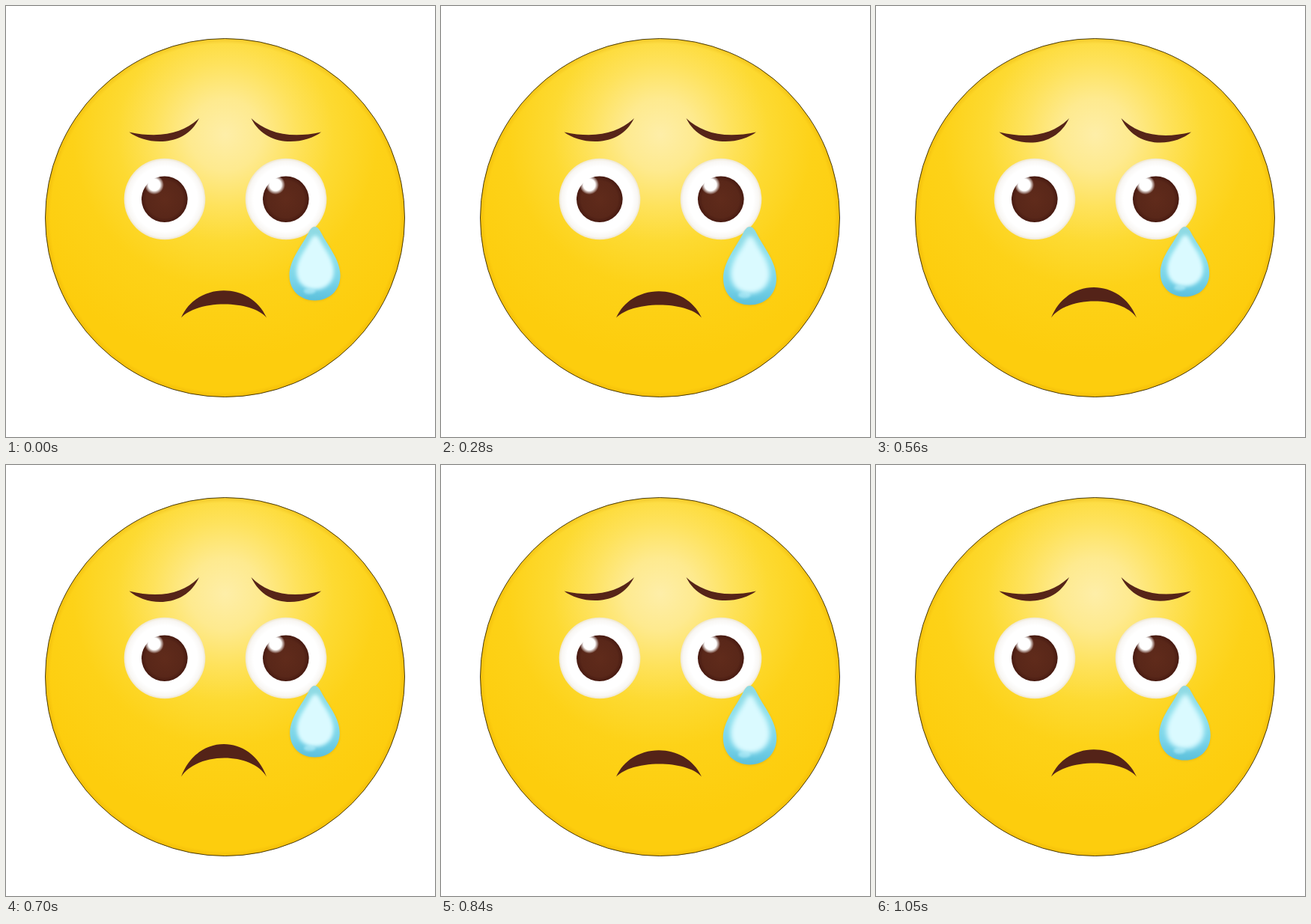
These frames come from a looping animation (573 px wide and 576 px high, 1120 ms). An HTML page:

```html
<!DOCTYPE html>
<html lang="en">
<head>
<meta charset="utf-8">
<title>Crying face</title>
<style>
  html, body { margin: 0; width: 100%; height: 100%; overflow: hidden; background: #fff; }
  svg { display: block; width: 100%; height: 100%; }
</style>
</head>
<body>
<svg viewBox="0 0 573 576" xmlns="http://www.w3.org/2000/svg">
  <defs>
    <radialGradient id="skin" gradientUnits="userSpaceOnUse" cx="293" cy="172" r="300">
      <stop offset="0" stop-color="#feeea8"/>
      <stop offset=".16" stop-color="#feea8f"/>
      <stop offset=".32" stop-color="#fee25c"/>
      <stop offset=".48" stop-color="#fdda32"/>
      <stop offset=".68" stop-color="#fdd218"/>
      <stop offset="1" stop-color="#fdcd0d"/>
    </radialGradient>
    <radialGradient id="rim">
      <stop offset=".97" stop-color="#e5a800" stop-opacity="0"/>
      <stop offset="1" stop-color="#dfa000" stop-opacity=".35"/>
    </radialGradient>
    <radialGradient id="white">
      <stop offset=".8" stop-color="#fff"/>
      <stop offset=".94" stop-color="#f8f6f3"/>
      <stop offset="1" stop-color="#efe6cd"/>
    </radialGradient>
    <radialGradient id="iris">
      <stop offset="0" stop-color="#602b1b"/>
      <stop offset=".8" stop-color="#592719"/>
      <stop offset="1" stop-color="#471a11"/>
    </radialGradient>
    <radialGradient id="glint">
      <stop offset=".6" stop-color="#fff"/>
      <stop offset="1" stop-color="#fff" stop-opacity="0"/>
    </radialGradient>
    <linearGradient id="water" x1="0" y1="0" x2="0" y2="1">
      <stop offset="0" stop-color="#8fd9e2"/>
      <stop offset=".4" stop-color="#8fe0ec"/>
      <stop offset=".75" stop-color="#78d3e8"/>
      <stop offset="1" stop-color="#5cc0dc"/>
    </linearGradient>
    <filter id="soft" x="-30%" y="-30%" width="160%" height="160%"><feGaussianBlur stdDeviation="4"/></filter>
    <filter id="shade" x="-30%" y="-30%" width="160%" height="160%"><feGaussianBlur stdDeviation="1.6"/></filter>
    <path id="drop" d="M0 0C3.5 0 6 3 9 9C17 25 34 44 34 65C34 85.5 19 98.5 0 98.5S-34 85.5-34 65C-34 44-17 25-9 9C-6 3-3.5 0 0 0Z"/>
    <g id="eye">
      <circle r="54.3" fill="url(#white)"/>
      <circle cx="-.2" cy=".3" r="30.8" fill="url(#iris)"/>
      <circle cx="-14" cy="-19" r="13" fill="url(#glint)"/>
    </g>
    <path id="brow" fill="#562418"/>
  </defs>

  <ellipse cx="292.5" cy="283" rx="240" ry="239.5" fill="url(#skin)"/>
  <ellipse cx="292.5" cy="283" rx="240" ry="239.5" fill="url(#rim)"/>
  <ellipse cx="292.5" cy="283" rx="240" ry="239.5" fill="none" stroke="#2b2205" stroke-opacity=".85"/>
  <use href="#brow"/>
  <use href="#brow" transform="translate(585.5) scale(-1 1)"/>
  <use href="#eye" x="212" y="258"/>
  <use href="#eye" x="374" y="258"/>
  <path id="mouth" fill="#542318"/>
  <g id="tear">
    <use href="#drop" y="1" fill="#b98c1c" opacity=".3" filter="url(#shade)"/>
    <use href="#drop" fill="url(#water)"/>
    <use href="#drop" transform="translate(.5 12) scale(.73)" fill="#dafaff" filter="url(#soft)"/>
    <ellipse cx="-7" cy="86" rx="8" ry="4" fill="#b9effa" opacity=".6" filter="url(#shade)"/>
  </g>
</svg>
<script>
  const STEP = 70, LOOP = 1120;
  const byId = id => document.getElementById(id);
  const [brow, mouth, tear] = ["brow", "mouth", "tear"].map(byId);

  // [time, value] keys: lower end of the tear, top of the mouth, sag of the brows
  const tearKeys = [[0, 394], [140, 400.5], [210, 401.5], [280, 400], [420, 396], [560, 389], [630, 388],
                    [700, 391], [840, 401], [910, 401.5], [1050, 395], [1120, 394]];
  const mouthKeys = [[0, 380], [70, 381], [420, 381], [560, 376], [700, 373], [840, 381], [980, 381], [1050, 380], [1120, 380]];
  const browKeys = [[0, 0], [280, 0], [420, .7], [560, 2], [700, 2.6], [840, 0], [980, 0], [1050, .8], [1120, 0]];

  function sample(keys, t) {
    const i = keys.findIndex(k => k[0] > t);
    const [t0, a] = keys[i - 1], [t1, b] = keys[i];
    return a + (b - a) * (t - t0) / (t1 - t0);
  }

  function render(now) {
    const t = Math.floor((now % LOOP) / STEP) * STEP;

    const sy = (sample(tearKeys, t) - 295) / 99;
    const sx = 1 + (sy - 1) * .72;
    tear.setAttribute("transform", `translate(412.5 295) scale(${sx} ${sy})`);

    const outer = (sample(mouthKeys, t) - 104) / .75;
    const inner = outer + 24.5;
    mouth.setAttribute("d", `M234 416.5C255 ${outer} 327 ${outer} 348 416.5C328 ${inner} 256 ${inner} 234 416.5Z`);

    const sag = sample(browKeys, t);
    brow.setAttribute("d", `M164.5 168.5C186 ${185 + sag} 238 ${191 + sag} 258 150C238 ${169 + sag / 2} 208 ${178 + sag / 2} 164.5 168.5Z`);
  }

  const start = performance.now();
  function tick() {
    render(performance.now() - start);
    requestAnimationFrame(tick);
  }
  tick();
</script>
</body>
</html>
```
